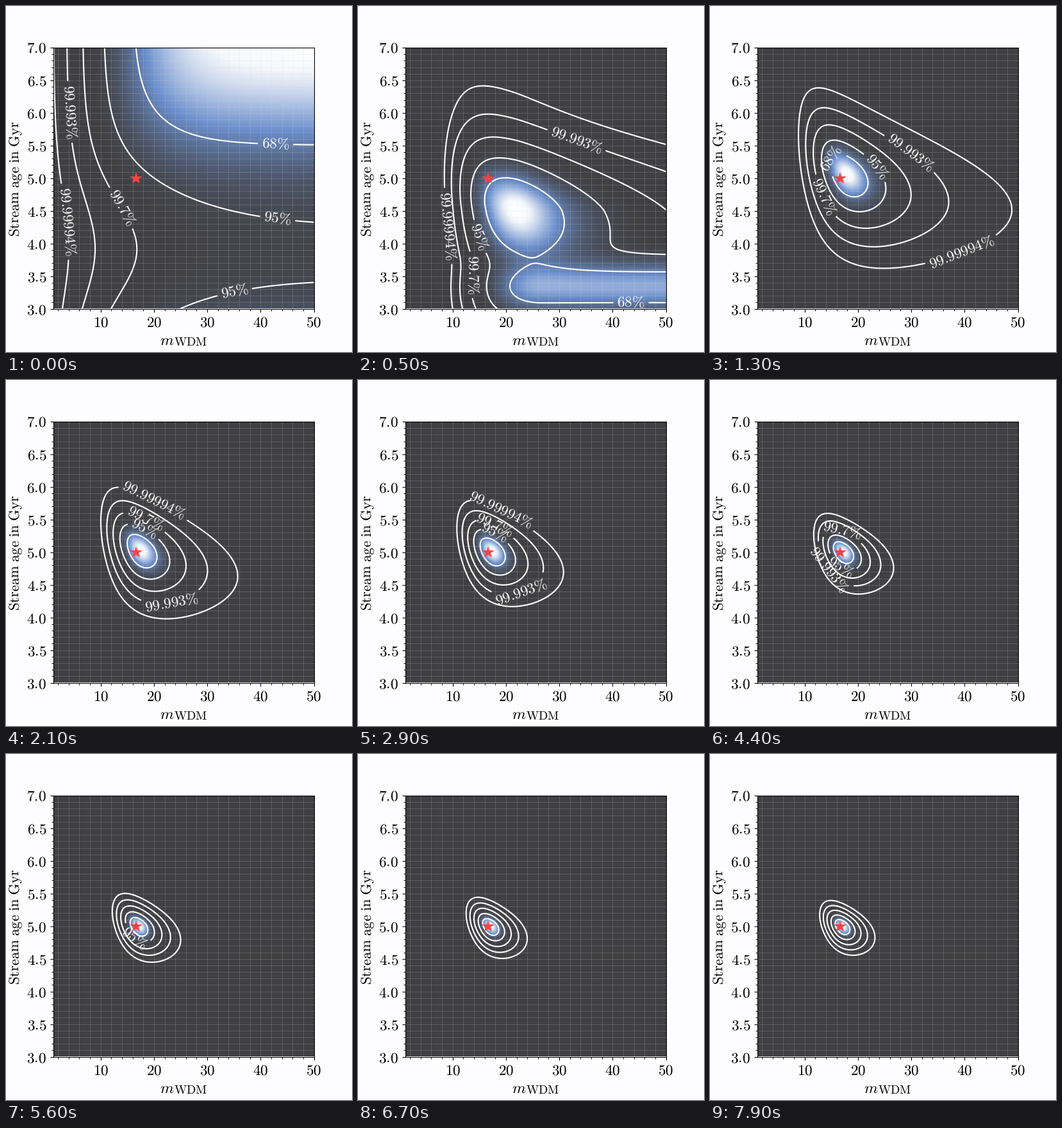
These frames come from a looping animation (540x540 px, 8 s). A matplotlib script:

```python
import numpy as np
import matplotlib.pyplot as plt
from matplotlib.animation import FuncAnimation
from matplotlib.colors import LinearSegmentedColormap
from matplotlib.ticker import FuncFormatter, MultipleLocator

plt.rcParams.update({"mathtext.fontset": "cm", "text.hinting": "none"})

SIZE, FRAMES, STEP = 540, 80, 100
LEFT, RIGHT, TOP, BOTTOM = 74, 480.5, 65, 472.5
PER_MASS = 8.32                       # pixels per unit of mass
FONT = 23.2
SIGMAS = {"68": 1.51, "95": 2.45, "99.7": 3.41, "99.993": 4.37, "99.99994": 5.35}
OUTER = 5.35
EGG_START = 1300


def mass(x):
    return 50 - (RIGHT - x) / PER_MASS


def age(y):
    return 3 + (BOTTOM - y) * 4 / (BOTTOM - TOP)


def warp(x):
    """Inverse square root of mass: contours are nearly elliptic in it."""
    return mass(x) ** -0.5


def bell(v, centre, width):
    return np.exp(-0.5 * ((v - centre) / width) ** 2)


def rm(text):
    return rf"$\mathrm{{{text}}}$"


# All surfaces are chi-square values over stage pixels.
X, Y = np.meshgrid(np.linspace(LEFT, RIGHT, 180), np.linspace(TOP, BOTTOM, 180))
M, A, U = mass(X), age(Y), warp(X)


def prior():
    reach = 6.1 * (1 + 0.45 * bell(Y, 375, 75))
    return 35 * np.exp(-M / reach) + 6.6 * bell(Y, 385, 120)


def early():
    """A tilted blob joined to a ridge of low age."""
    p = (U - 0.213) / np.where(U > 0.213, 0.0245, 0.022)
    q = (318 - Y) / np.where(Y < 318, 33 + 4 * bell(Y, 90, 50), 45)
    blob = (p * p + q * q - 0.6 * p * q) / 0.91
    ridge = 1.2 + (np.maximum(0, U - 0.193) / 0.0245) ** 2 + ((Y - 439) / 23) ** 2
    return -2 * np.logaddexp(-blob / 2, -ridge / 2)


def waves(angle):
    k = np.arange(1, 4)
    a = np.asarray(angle)[..., None] * k
    return np.concatenate([np.ones(a.shape[:-1] + (1,)), np.cos(a), np.sin(a)], -1)


# Outermost contour at EGG_START, seen from the peak
PEAK = (214, 263)
OUTLINE = np.array([(137, 218), (145, 165), (180, 127), (250, 157), (314, 196),
                    (400, 242), (486, 296), (440, 340), (330, 390), (255, 422),
                    (202, 395), (165, 341)], float)
ou = 10 * (warp(OUTLINE[:, 0]) - warp(PEAK[0]))
ov = age(OUTLINE[:, 1]) - age(PEAK[1])
SHAPE = np.linalg.lstsq(waves(np.arctan2(ov, ou)), 1 / (ou ** 2 + ov ** 2), rcond=None)[0]


def egg(t):
    """The outline shrinks about the peak as evidence adds up."""
    gain = t / EGG_START
    px, py = 205 + 9 / gain, 271 - 8 / gain
    du = 10 * (U - warp(px)) * gain ** 0.55
    dv = (A - age(py)) * gain ** 0.66
    rho = np.sqrt((du ** 2 + dv ** 2) * (waves(np.arctan2(dv, du)) @ SHAPE))
    bend = 0.17 / gain
    r = np.linspace(0, 9, 400)
    return (OUTER * np.interp(rho, (1 - bend) * r + bend * r ** 3, r)) ** 2


PRIOR, EARLY, FIRST_EGG = prior(), early(), egg(EGG_START)


def field(t):
    if t < 500:
        s = PRIOR + (EARLY - PRIOR) * t / 500
    elif t < EGG_START:
        s = EARLY + (FIRST_EGG - EARLY) * (t - 500) / (EGG_START - 500)
    else:
        s = egg(t)
    return s - s.min()


# start time: contour labels with a point close to each
LABELS = {
    0: [("99.99994", 91, 337), ("99.993", 106, 165), ("99.7", 187, 311),
        ("95", 425, 323), ("95", 360, 462), ("68", 421, 206)],
    300: [("99.99994", 133, 344), ("99.993", 341, 210), ("99.7", 182, 420),
          ("95", 195, 358), ("68", 426, 467)],
    900: [("99.99994", 385, 363), ("99.993", 316, 224), ("99.7", 174, 299),
          ("95", 268, 244), ("68", 187, 238)],
    2100: [("99.99994", 221, 207), ("99.993", 254, 328), ("99.7", 211, 229),
           ("95", 211, 241)],
    3700: [("99.993", 186, 296), ("99.7", 209, 227), ("95", 205, 290)],
    5000: [("95", 199, 289)],
    6400: [],
}

fig = plt.figure(figsize=(SIZE / 72, SIZE / 72), dpi=72, facecolor="#fdfcfe")
ax = fig.add_axes([LEFT / SIZE, 1 - BOTTOM / SIZE,
                   (RIGHT - LEFT) / SIZE, (BOTTOM - TOP) / SIZE])
cmap = LinearSegmentedColormap.from_list(
    "glow", [(0, "#403f41"), (0.42, "#6b8fcd"), (0.9, "#f4f7fc"), (1, "#ffffff")])
image = ax.imshow(np.zeros_like(X), cmap=cmap, vmin=0, vmax=1, aspect="auto",
                  interpolation="bilinear", extent=(mass(LEFT), 50, 3, 7))
ax.plot(16.7, 5, "*", color="#ff4143", ms=20, mew=0, zorder=10)
ax.set(xlim=(mass(LEFT), 50), ylim=(3, 7))

for axis, major, minor, digits in ((ax.xaxis, 10, 2, 0), (ax.yaxis, 0.5, 0.1, 1)):
    axis.set_major_locator(MultipleLocator(major))
    axis.set_minor_locator(MultipleLocator(minor))
    axis.set_major_formatter(FuncFormatter(lambda v, _, d=digits: rm(f"{v:.{d}f}")))
ax.tick_params(which="major", length=5, width=1.1, pad=6, labelsize=FONT)
ax.tick_params(which="minor", length=3, width=0.9)
ax.grid(which="both", color="#d8d8d0", alpha=0.24, lw=0.8)
for spine in ax.spines.values():
    spine.set_linewidth(1.1)


def note(x, y, text, size=FONT, **kw):
    fig.text(x / SIZE, 1 - y / SIZE, text, fontsize=size, va="baseline", **kw)


note(240, 528.5, "$m$", 24)
note(261.5, 531, rm("WDM"), 18.8)
note(21, 269.5, rm(r"Stream\ age\ in\ Gyr"), 22.5, rotation=90,
     rotation_mode="anchor", ha="center")

contours = []


def update(i):
    t = i * STEP
    while contours:
        contours.pop().remove()
    for text in list(ax.texts):
        text.remove()

    s = field(t)
    image.set_data(np.exp(-s / 2))
    spots = LABELS[max(start for start in LABELS if start <= t)]
    for name, sigma in SIGMAS.items():
        cs = ax.contour(M, A, s, [sigma ** 2], colors="white", linewidths=2.1)
        contours.append(cs)
        where = [(mass(x), age(y)) for label, x, y in spots if label == name]
        if where:
            texts = cs.clabel(manual=where, inline=True, inline_spacing=6, fontsize=FONT,
                              fmt=lambda _, n=name: rm(n + r"\%"))
            for text in texts:
                text.set_clip_box(ax.bbox)
                text.set_clip_on(True)
    return []


anim = FuncAnimation(fig, update, frames=FRAMES, interval=STEP, repeat=True,
                     repeat_delay=0, blit=False)
plt.show()
```
